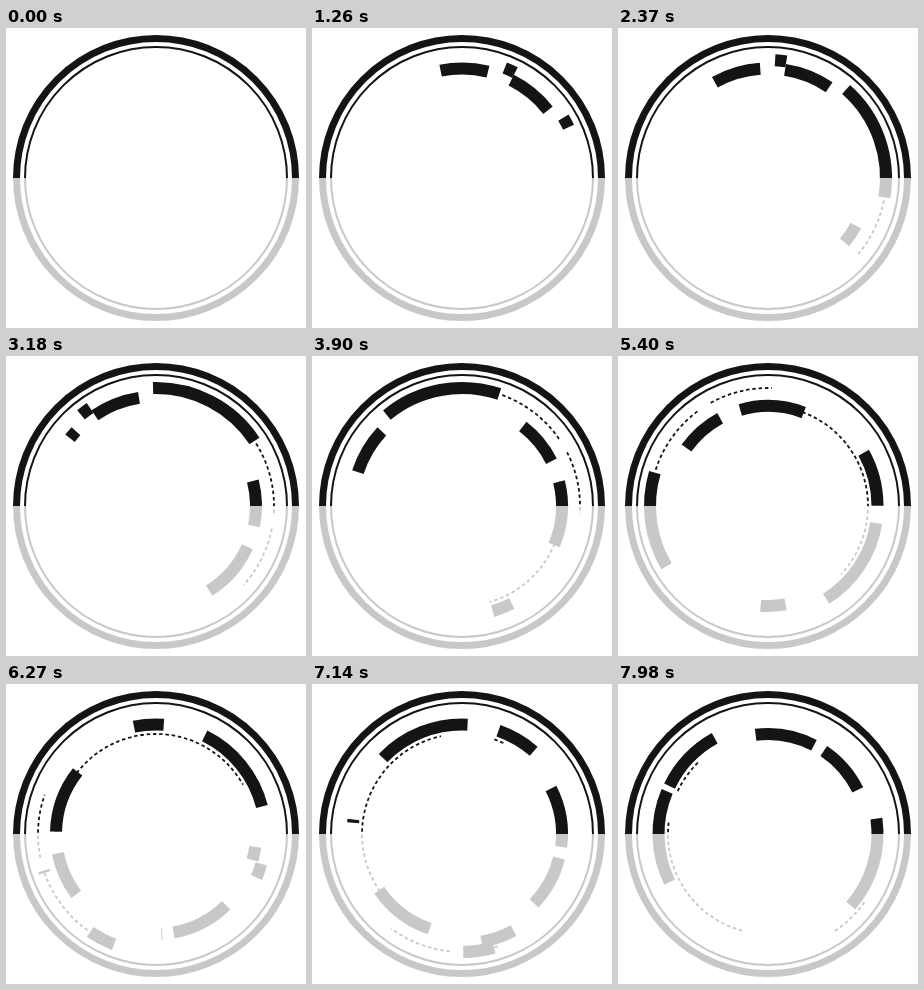
Animation of 300x300 px, one loop 8000 ms. Source, as an HTML page with a canvas:

```html
<!DOCTYPE html>
<html>
<head>
<meta charset="utf-8">
<style>
  html, body { margin: 0; overflow: hidden; background: #fff; }
  canvas { display: block; }
</style>
</head>
<body>
<canvas width="300" height="300"></canvas>
<script>
const ctx = document.querySelector('canvas').getContext('2d');
const LOOP = 8, CENTER = 150, RAD = Math.PI / 180;
const WIPE = 16; // degrees per second

// The wheel turns counterclockwise and gathers speed: [seconds, degrees]
const TURN = [[.2, 0], [1.8, 17], [2.37, 29], [3.9, 110], [5.4, 202], [8, 418.7]];

// Segments fixed on the wheel, in degrees. "born" opens one from its end, "gone" closes it to its start.
const seg = (start, end, { born = -99, gone = 99 } = {}) => ({ start, end, born, gone });
const inner = [
  seg(147.5, 173.5), seg(186, 223), seg(372, 406, { gone: 6.75 }), seg(410, 444.5), seg(451, 481)
];
const middle = [
  seg(0, 25), seg(38, 63), seg(263, 292, { gone: 7.25 }), seg(301, 350),
  seg(351, 388, { born: 5.8 }), seg(499, 548)
];
const outer = [seg(32.5, 38), seg(70.5, 128.5), seg(151, 166.5, { born: 6.2 })];
const innerDots = [seg(186, 335), seg(352, 373, { born: 6.7 })];
const outerDots = [seg(130, 166), seg(173, 204)];

// Black above the horizon, grey below it
const ink = ctx.createLinearGradient(0, 0, 0, 300);
[[0, '#141414'], [.5, '#141414'], [.5, '#c8c8c8'], [1, '#c8c8c8']]
  .forEach(([stop, color]) => ink.addColorStop(stop, color));

function turnAt(t) {
  if (t <= TURN[0][0]) return 0;
  const i = TURN.findIndex(([time]) => time >= t);
  const [t0, a0] = TURN[i - 1], [t1, a1] = TURN[i];
  return a0 + (a1 - a0) * (t - t0) / (t1 - t0);
}

function arc(radius, width, from = 0, to = 360) {
  ctx.lineWidth = width;
  ctx.beginPath();
  ctx.arc(CENTER, CENTER, radius, from * RAD, to * RAD);
  ctx.stroke();
}

function draw(now) {
  const t = now / 1000 % LOOP;
  const turn = turnAt(t);
  const head = 75 * (t - .25);      // new parts appear up to here
  const tail = .47 * (turn - 29);   // old parts are erased up to here

  function lane(segments, radius, width, erased = tail) {
    for (const { start, end, born, gone } of segments) {
      const from = Math.max(start, erased, end - WIPE * (t - born));
      const to = Math.min(end, head, start + WIPE * (gone - t));
      if (to - from > .1) arc(radius, width, from - turn - 90, to - turn - 90);
    }
  }

  ctx.fillStyle = '#fff';
  ctx.fillRect(0, 0, 300, 300);
  ctx.strokeStyle = ink;
  arc(139.5, 7);
  arc(131, 2);
  const innerEdge = Math.max(tail, turn - 165);
  ctx.setLineDash([3.5, 2.8]);
  lane(innerDots, 100, 1.8, innerEdge);
  lane(outerDots, 118, 1.8);
  ctx.setLineDash([]);
  lane(inner, 100, 12, innerEdge);
  lane(middle, 109.5, 12);
  lane(outer, 118, 12);
  requestAnimationFrame(draw);
}
requestAnimationFrame(draw);
</script>
</body>
</html>
```
